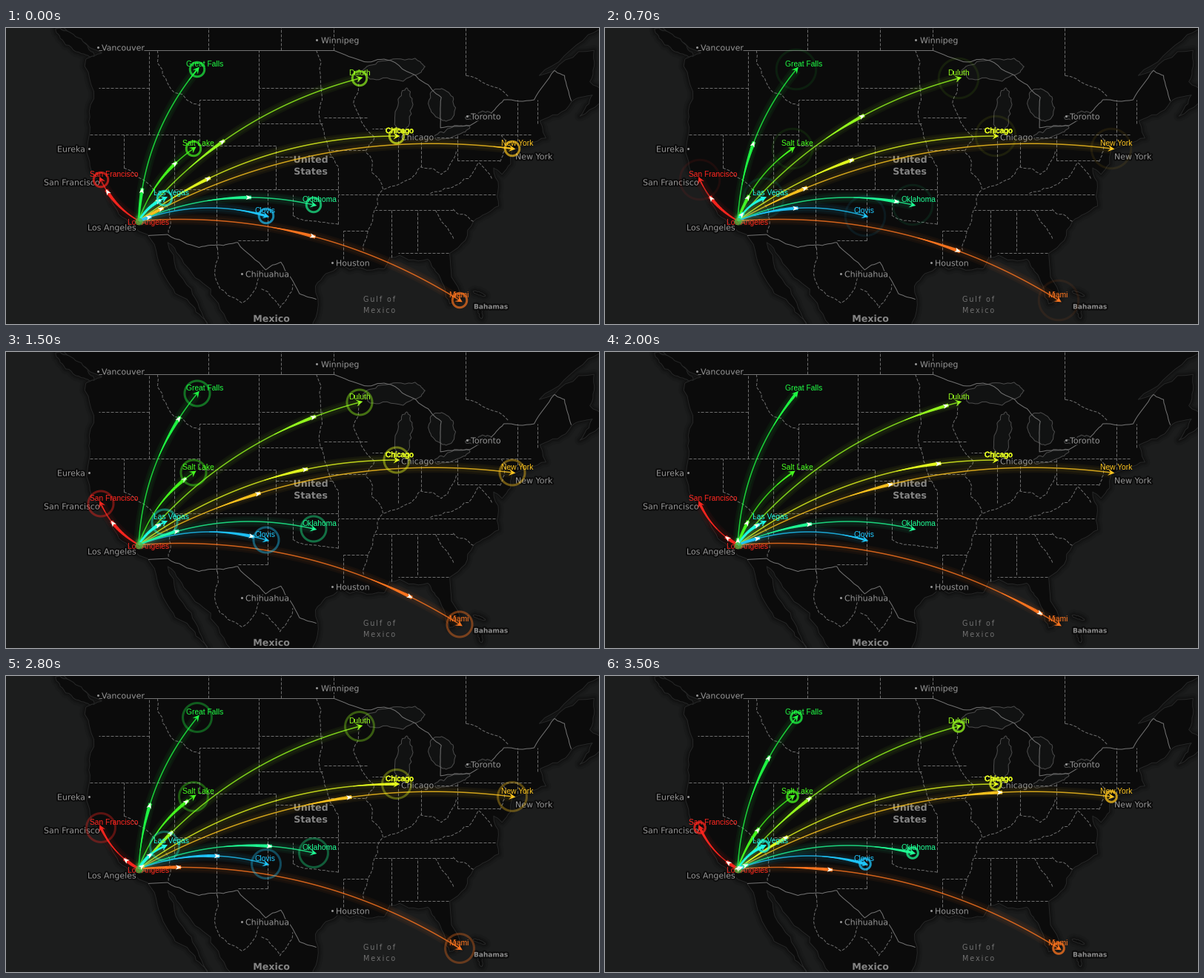
Recreate the animation shown at these times as a matplotlib script. Size 800x400 px, loop 3.6 s.

```python
import colorsys

import matplotlib.pyplot as plt
import numpy as np
from matplotlib.animation import FuncAnimation
from matplotlib.collections import LineCollection, PolyCollection
from matplotlib.patheffects import Normal, Stroke

W, H, DPI = 800, 400, 100
FRAMES, STEP = 36, 100
PT = 72 / DPI

WATER, LAND, GREY = "#1c1d1d", "#0b0b0b", "#969696"

# Geography is (degrees west, degrees north); key points are roughened when drawn.
COAST = [
    (127.5, 51), (122.6, 48.8), (124.5, 48.3), (124.1, 44), (124.4, 40.4), (122.4, 37.4),
    (120.6, 34.6), (117.2, 32.6), (115, 28.1), (112.2, 25.5), (110, 23), (112, 27),
    (114.8, 31.8), (112.2, 29), (109.3, 26), (105.5, 22), (97.7, 22), (97.3, 27.3),
    (94.5, 29.5), (89.2, 29.1), (88.5, 30.3), (84, 30.1), (82.7, 28.5), (81.4, 25.4),
    (80.1, 26), (81.4, 30.7), (78.6, 33.9), (75.6, 35.4), (76.2, 39), (75.2, 38.4),
    (74, 40.6), (70, 41.7), (70.7, 43.2), (67, 44.8), (64.5, 45.4), (66, 43.6), (61, 45.3),
    (64.8, 46.5), (64.3, 49), (70.8, 47), (65, 50.2), (60, 50.3), (60, 52), (127.5, 52),
]
# lon, lat, half width, half height, tilt in degrees
BLOBS = {
    "lakes": [(88, 47.5, 42, 14, -5), (86.9, 43.9, 11, 34, 8), (82.3, 44.6, 17, 23, -25),
              (81.2, 42.2, 26, 6, -18), (77.9, 43.6, 19, 5, -6)],
    "islands": [(125.8, 49.6, 32, 8, 36), (77.9, 26.5, 9, 2, 20), (77.8, 24.5, 3, 9, -15)],
}
# lat, west, east
PARALLELS = [
    (46, 117, 123), (42, 111, 124.2), (45, 104, 111), (41, 102, 111), (37, 94.6, 114),
    (46, 96.5, 104), (43, 96.5, 104), (40, 95.3, 102), (32, 103, 106.6), (43.5, 91.2, 96.5),
    (40.6, 91.5, 95.8), (42.5, 87.8, 90.6), (41.75, 80.5, 87), (36.5, 76, 94.6),
    (35, 81, 90.2), (33, 91.1, 94), (30.7, 81.5, 87.5), (39.7, 75.5, 80.5), (42, 71.8, 79.8),
]
# lon, south, north
MERIDIANS = [
    (117, 42, 49), (120, 39, 42), (114, 35, 42), (111, 41, 45), (109, 31.3, 41),
    (104, 41, 49), (102, 37, 41), (103, 32, 37), (100, 34.6, 36.5), (94.6, 33.6, 39.1),
    (94, 29.7, 33), (87.5, 38, 41.7), (84.8, 39.1, 41.7), (88.3, 30.3, 35), (85.2, 31, 35),
    (80.5, 39.7, 42), (73.4, 41, 45), (71, 43, 45),
    (110, 49, 51), (101.4, 49, 51), (95.15, 49, 51), (79.5, 47, 51),
]
RIVERS = [
    [(92.2, 46.7), (92.8, 44.7), (90.3, 41.8), (91.3, 40.4), (89.3, 37), (91.1, 33), (91.6, 31)],
    [(97.2, 49), (96.5, 45), (96.4, 42.5), (95.3, 40), (94.6, 39.1)],
    [(89.2, 37), (86, 38), (84.8, 39.1), (82.4, 38.4), (80.6, 40.6)],
    [(116, 49), (116, 48), (114, 45.6), (111, 44.5)],
    [(120, 39), (114.6, 35), (114.7, 32.7)],
    [(100, 34.5), (97, 33.9), (94.5, 33.6)],
    [(83.7, 36.6), (80.3, 37.5), (78, 39.5), (76.4, 38)],
    [(83.1, 35), (80.9, 32.1)],
    [(81, 35.1), (78.6, 33.9)],
    [(75.3, 42), (74.8, 41.2), (75.5, 39.5)],
    [(74.5, 45.3), (79.5, 47)],
    [(108.9, 31.3), (108.6, 27), (106, 25.5), (103.5, 29)],
    [(103.7, 27), (101.5, 25), (100, 27.5)],
]
NORTH = [(95.15, 49), (91.5, 48.1), (88.4, 48.2), (84.6, 46.5), (82.4, 45.2), (82.5, 42.6),
         (79, 42.8), (76.8, 43.7), (75, 45), (71.4, 45), (69, 47.4), (67.8, 47), (67, 44.9)]
SOUTH = [(114.8, 32.6), (111.1, 31.3), (108.2, 31.5), (106.5, 31.8), (103.2, 29),
         (101.4, 29.8), (99.2, 26.5), (97.2, 25.9)]

HOME = np.array([179.0, 260.5])
# name, x, y, share of the route already covered at the start; in order of hue
ROUTES = [
    ("San Francisco", 128, 205, 0.80),
    ("Miami", 612, 368, 0.53),
    ("New York", 683, 163, 0.07),
    ("Chicago", 527, 146, 0.30),
    ("Duluth", 477, 68, 0.44),
    ("Salt Lake", 253, 163, 0.77),
    ("Great Falls", 258, 56, 0.195),
    ("Oklahoma", 415, 239, 0.65),
    ("Las Vegas", 214, 230, 0.88),
    ("Clovis", 351, 254, 0.10),
]
CURVE = 0.163
TRAIL_MS, TRAIL_N = 650, 30
RING_MS, RING_R = 1200, 29.2

rng = np.random.default_rng(4)


def project(points):
    lon, lat = np.array(points, float).T
    merc = np.log(np.tan(np.pi / 4 + np.radians(lat) / 2))
    return np.column_stack([179 + 11.39 * (118.24 - lon), 259.3 - 652.6 * (merc - 0.6327)])


def rough(pts, amount=0.07, levels=3):
    """Midpoint displacement: each pass bends every segment a little."""
    for _ in range(levels):
        step = np.diff(pts, axis=0)
        push = rng.normal(0, amount, (len(step), 1)) * step[:, ::-1] * [1, -1]
        out = np.empty((2 * len(pts) - 1, 2))
        out[::2] = pts
        out[1::2] = pts[:-1] + step / 2 + np.clip(push, -5, 5)
        pts = out
    return pts


def blob(lon, lat, rx, ry, tilt):
    a, t = np.linspace(0, 2 * np.pi, 13), np.radians(tilt)
    x, y = rx * np.cos(a), ry * np.sin(a)
    ring = np.column_stack([x * np.cos(t) - y * np.sin(t), x * np.sin(t) + y * np.cos(t)])
    return rough(project([(lon, lat)]) + ring, 0.12, 2)


class Route:
    def __init__(self, i, name, x, y, phase):
        self.name, self.phase = name, phase
        self.color = colorsys.hsv_to_rgb((2 + 21.4 * i) / 360, 0.88, 1)
        self.end = np.array([x, y], float)
        dx, dy = self.end - HOME
        self.length = np.hypot(dx, dy)
        self.ctrl = (HOME + self.end) / 2 + CURVE * np.array([dy, -dx])

    def at(self, p):
        p = np.asarray(p, float)[..., None]
        return (1 - p) ** 2 * HOME + 2 * p * (1 - p) * self.ctrl + p ** 2 * self.end

    def heading(self, p):
        d = (1 - p) * (self.ctrl - HOME) + p * (self.end - self.ctrl)
        return d / np.hypot(*d)

    def progress(self, ms):
        return (self.phase + travel(ms) / self.length) % 1


def travel(ms):
    return np.where(ms < 2000, 0.0925 * ms, 185 + 0.0995 * (ms - 2000))


def arrow(tip, way, size, half, notch):
    side = np.array([-way[1], way[0]])
    back = tip - way * size
    return np.array([tip, back + side * half, back + way * size * notch, back - side * half])


routes = [Route(i, *r) for i, r in enumerate(ROUTES)]

fig = plt.figure(figsize=(W / DPI, H / DPI), dpi=DPI, facecolor=WATER)
ax = fig.add_axes([0, 0, 1, 1])
ax.set_xlim(0, W)
ax.set_ylim(H, 0)
ax.axis("off")


def write(x, y, text, px, color, font="DejaVu Sans", ha="left", z=3, edge=LAND, lw=4.0, **kw):
    t = ax.text(x, y, text, fontsize=px * PT, color=color, family=font, ha=ha,
                va="center_baseline", zorder=z, **kw)
    if edge:
        t.set_path_effects([Stroke(linewidth=lw * PT, foreground=edge), Normal()])


def polygons(shapes, fill, edge, width):
    ax.add_collection(PolyCollection(shapes, facecolors=fill, edgecolors=edge,
                                     linewidths=width * PT, zorder=1))


def borders(lines, color, style="solid"):
    ax.add_collection(LineCollection(lines, colors=color, linewidths=PT, linestyles=style,
                                     zorder=2))


# base map
land = [rough(project(COAST))] + [blob(*b) for b in BLOBS["islands"]]
for width, shade in ((14, "#191a1a"), (8, "#151616"), (4, "#111111")):
    polygons(land, "none", shade, width)
polygons(land, LAND, "#262727", 1)
polygons([blob(*b) for b in BLOBS["lakes"]], "#111212", "#4c4c4c", 1)

straight = [[(w, lat), (e, lat)] for lat, w, e in PARALLELS]
straight += [[(lon, s), (lon, n)] for lon, s, n in MERIDIANS]
borders([project(l) for l in straight] + [rough(project(r)) for r in RIVERS],
        "#6e6e6e", (0, (4, 2)))
borders([project([(123, 49), (95.15, 49)]), project([(117.1, 32.5), (114.8, 32.6)]),
         rough(project(NORTH), 0.04), rough(project(SOUTH), 0.04)], "#747474")

# text, x, y, dot offset from the left edge of the text (0: no dot)
TOWNS = [("Vancouver", 129, 26, -5), ("Winnipeg", 425, 16, -6), ("Eureka", 69, 163, 43),
         ("Toronto", 627, 119, -5), ("Chicago", 533, 147, 0), ("New York", 687, 173, 0),
         ("San Francisco", 51, 208, 0), ("Los Angeles", 110, 269, 0),
         ("Chihuahua", 323, 332, -5), ("Houston", 445, 317, -5)]
for text, x, y, dot in TOWNS:
    write(x, y + 0.5, text, 11, GREY)
    if dot:
        ax.plot(x + dot, y, "o", ms=3 * PT, color=GREY, mew=0, zorder=3)
for text, x, y in [("United", 411, 177), ("States", 411, 193), ("Mexico", 358, 392)]:
    write(x, y, text, 12.6, "#858585", ha="center", weight="bold")
for text, y in [("Gulf of", 366), ("Mexico", 381)]:
    write(504, y, "\u2009".join(text), 9.7, "#707070", ha="center", edge=None)
write(631, 376, "Bahamas", 9, "#8c8c8c", weight="bold")

# routes and city labels
for r in routes:
    path = r.at(np.linspace(0, 1, 60))
    for width, alpha in ((14, 0.05), (9, 0.05), (1.5, 0.8)):
        ax.plot(*path.T, color=r.color, lw=width * PT, alpha=alpha, zorder=4,
                solid_capstyle="butt")
    way = r.heading(1)
    ax.fill(*arrow(r.end + 4.5 * way, way, 9, 4.5, 0.4).T, color=r.color, lw=0, zorder=5)
    write(*(r.end - [15, 8]), r.name, 10.3, r.color, "Liberation Sans", z=7,
          edge=r.color if r.name == "Chicago" else None, lw=0.6)
write(HOME[0] - 15, 262, "Los Angeles", 10.3, routes[0].color, "Liberation Sans", z=3.5,
      edge=None)
ax.plot(*HOME, "o", ms=10 * PT, color="#55b840", alpha=0.75, mew=0, zorder=6)

trails = ax.add_collection(LineCollection([], zorder=5.5, capstyle="butt"))
heads = ax.add_collection(PolyCollection([], facecolors="#fbfff4", edgecolors="none", zorder=6.5))
rings = ax.add_collection(LineCollection([], linewidths=3 * PT, zorder=8))

angle = np.linspace(0, 2 * np.pi, 61)
circle = np.column_stack([np.cos(angle), np.sin(angle)])
ages = np.linspace(0, TRAIL_MS, TRAIL_N + 1)
taper = (4.8 - 4 * np.arange(TRAIL_N) / TRAIL_N) * PT


def update(frame):
    ms = frame * STEP
    segs, widths, colors, tips = [], [], [], []
    for r in routes:
        past = r.progress(ms - ages)
        pts = r.at(past)
        for k in np.flatnonzero(np.diff(past) < 0):  # skip the jump back to the start
            segs.append(pts[k:k + 2])
            widths.append(taper[k])
            colors.append(r.color)
        way = r.heading(past[0])
        tips.append(arrow(pts[0] + way, way, 8, 3.2, 0.25))
    trails.set_segments(segs)
    trails.set_linewidths(widths)
    trails.set_colors(colors)
    heads.set_verts(tips)

    u = (ms - 800) % RING_MS / RING_MS
    rings.set_segments([r.end + RING_R * u * circle for r in routes])
    rings.set_colors([(*r.color, 1 - u if u else 0) for r in routes])
    return trails, heads, rings


anim = FuncAnimation(fig, update, frames=FRAMES, interval=STEP, repeat=True, repeat_delay=0,
                     blit=False)
plt.show()
```
